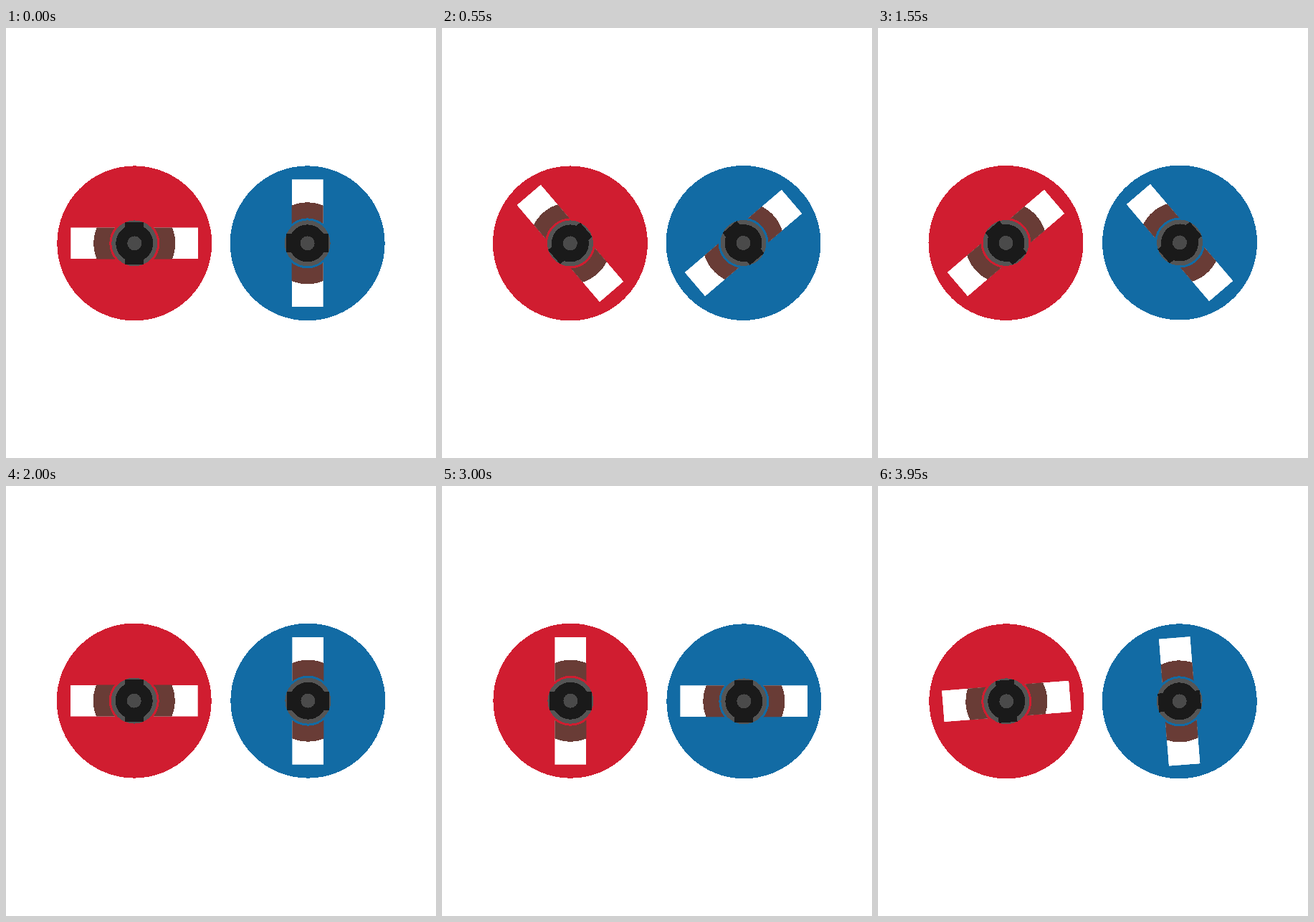
These frames come from a looping animation (600 px wide and 600 px high, 4 s). An HTML page:

```html
<!DOCTYPE html>
<html lang="en">
<head>
<meta charset="utf-8">
<title>Two spinning discs</title>
<style>
html, body { margin: 0; width: 100%; height: 100%; overflow: hidden; background: #fff; }
svg { display: block; width: 100vw; height: 100vh; }
</style>
</head>
<body>
<svg viewBox="0 0 600 600" shape-rendering="crispEdges">
  <defs>
    <clipPath id="slot"><rect x="-89" y="-22" width="178" height="44"/></clipPath>
    <g id="rotor">
      <circle r="108"/>
      <g clip-path="url(#slot)">
        <rect x="-89" y="-22" width="178" height="44" fill="#fff"/>
        <circle r="57" fill="#693c36"/>
      </g>
      <circle r="35"/>
      <circle r="32" fill="#555"/>
      <circle r="26" fill="#1a1a1a"/>
      <rect x="-13" y="-29.5" width="26" height="59" fill="#1a1a1a"/>
      <circle r="10" fill="#4a4a4a"/>
    </g>
  </defs>
  <use href="#rotor" fill="#d01d30"/>
  <use href="#rotor" fill="#126ba4"/>
</svg>
<script>
const LOOP = 4000, STEP = 50, WOBBLE = 0.5;
const discs = [
  { x: 179, start: 0, lean: 54 },
  { x: 421, start: 90, lean: 135 }
];
const nodes = document.querySelectorAll('svg > use');

function draw() {
  const time = Math.floor(performance.now() % LOOP / STEP) * STEP;
  const turn = time / LOOP * 360;
  discs.forEach(({ x, start, lean }, i) => {
    // Each disc sits slightly off its axle.
    const a = (turn + lean) * Math.PI / 180;
    const cx = x + WOBBLE * Math.cos(a);
    const cy = 300 + WOBBLE * Math.sin(a);
    nodes[i].setAttribute('transform', `translate(${cx} ${cy}) rotate(${turn + start})`);
  });
  requestAnimationFrame(draw);
}
draw();
</script>
</body>
</html>
```
